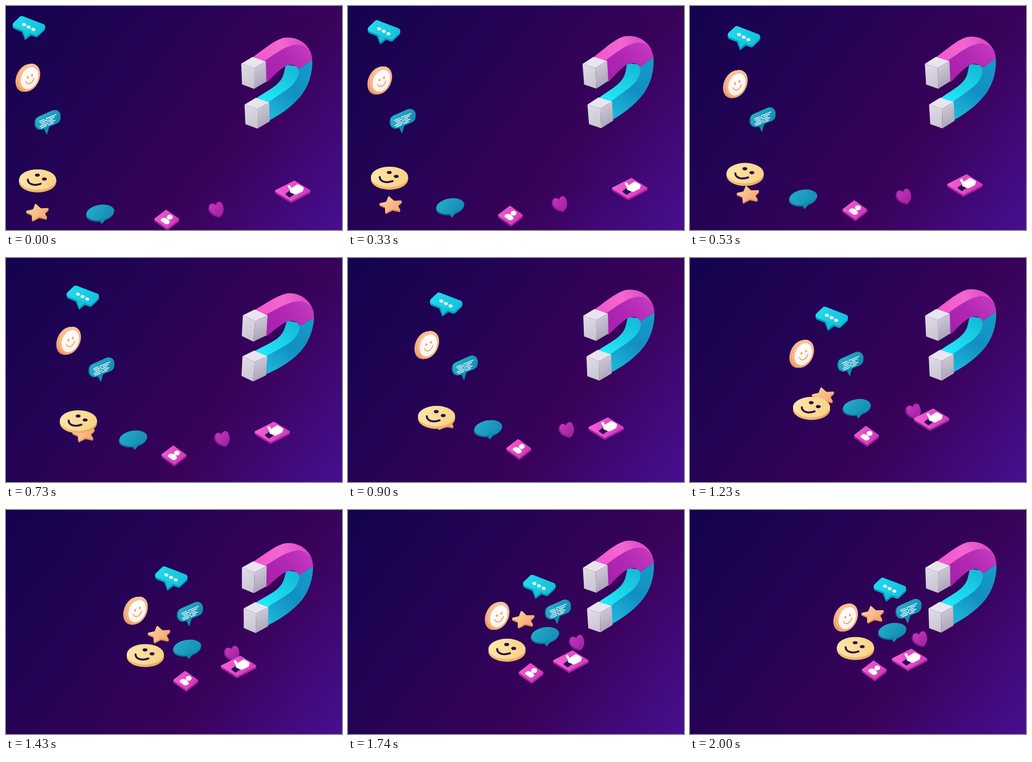
Animation of 600x400 px, one loop 2.03 s. Source, as an HTML page with a canvas:

```html
<!DOCTYPE html>
<html lang="en">
<head>
<meta charset="utf-8">
<title>Magnet pulling icons</title>
<style>
html, body { margin: 0; width: 100%; height: 100%; overflow: hidden; background: #26024f; }
canvas { display: block; width: 600px; height: 400px; }
</style>
</head>
<body>
<canvas id="stage" width="600" height="400"></canvas>
<script>
const ctx = document.getElementById('stage').getContext('2d');
const LOOP = 2030, STEP = 100 / 3, LAST = 60, TAU = Math.PI * 2;
const INK = '#2a0a4c';

function lin(x0, y0, x1, y1, ...colors) {
  const g = ctx.createLinearGradient(x0, y0, x1, y1);
  colors.forEach((c, i) => g.addColorStop(i / (colors.length - 1), c));
  return g;
}

function fill(d, style) {
  ctx.fillStyle = style;
  ctx.fill(typeof d === 'string' ? new Path2D(d) : d);
}

function line(d, style, width) {
  ctx.strokeStyle = style;
  ctx.lineWidth = width;
  ctx.lineCap = ctx.lineJoin = 'round';
  ctx.stroke(new Path2D(d));
}

function oval(x, y, rx, ry, rot = 0) {
  const p = new Path2D();
  p.ellipse(x, y, rx, ry, rot, 0, TAU);
  return p;
}

// Polygon with rounded corners
function poly(pts, r) {
  const p = new Path2D(), n = pts.length;
  const [a, b] = [pts[n - 1], pts[0]];
  p.moveTo((a[0] + b[0]) / 2, (a[1] + b[1]) / 2);
  pts.forEach((q, i) => p.arcTo(...q, ...pts[(i + 1) % n], r));
  p.closePath();
  return p;
}

// Flat tile lying on the ground, its top corner moved sideways by skew
function tile(x, y, rx, ry, skew, r) {
  return poly([[x - rx, y], [x + skew, y - ry], [x + rx, y], [x - skew, y + ry]], r);
}

// Face with a solid side reaching to (dx, dy)
function slab(p, dx, dy, side, face) {
  const n = Math.ceil(Math.hypot(dx, dy) * 2);
  for (let i = n; i > 0; i--) {
    ctx.save();
    ctx.translate(dx * i / n, dy * i / n);
    fill(p, side);
    ctx.restore();
  }
  fill(p, face);
}

function chat() {
  fill('M28 46L34 61L47 51Z', '#0a98b8');
  slab(tile(41, 35, 33, 18, -14, 5), 0, 3.5, '#0b9fbf', lin(12, 25, 68, 45, '#22dcee', '#14bfdc'));
  fill('M30 43L34.5 57L46 47Z', '#16c3dd');
  for (let i = -1; i <= 1; i++) fill(oval(40.5 + 8.3 * i, 37.5 + 4.4 * i, 3.6, 2.7, 0.3), '#fff');
}

function coin() {
  slab(oval(41.5, 128, 18, 25.8, 0.42), -5, 0.5, lin(17, 105, 40, 155, '#ffc89a', '#e58a58'),
    lin(30, 105, 52, 152, '#fcc79d', '#f2a473'));
  fill(oval(42, 129, 14.5, 20.5, 0.42), lin(34, 112, 50, 148, '#fff', '#fff1e6'));
  const ink = '#f0a070';
  fill(oval(38.5, 127.5, 1.7, 2.4, 0.3), ink);
  fill(oval(46.5, 123.5, 1.7, 2.4, 0.3), ink);
  line('M35 135C38 142 47 139 50 129', ink, 1.7);
}

function textBubble() {
  fill('M65 214L73 230L79 210Z', '#128bab');
  slab(poly([[53, 200], [98, 180], [97, 207], [53, 225]], 10), -2, 1, '#107d9e',
    lin(55, 195, 92, 215, '#2ab0cd', '#148bb0'));
  ctx.save();
  ctx.transform(1, -0.42, 0, 1, 57, 206.5);
  ctx.fillStyle = '#eef9fc';
  for (let row = 0; row < 5; row++) {
    const left = 2 + row * 7 % 5, split = 12 + row * 5 % 8, right = 33 - row * 3 % 7;
    ctx.fillRect(left, row * 3.2, split - left, 1.6);
    ctx.fillRect(split + 2, row * 3.2, right - split - 2, 1.6);
  }
  ctx.restore();
}

function smiley() {
  slab(oval(56.5, 310, 33, 18.3), 0, 4.5, lin(24, 0, 90, 0, '#f6c078', '#eda565'),
    lin(30, 300, 85, 322, '#fde5a6', '#f9d386'));
  fill(oval(56, 302, 4.3, 2.8), INK);
  fill(oval(68.5, 309, 4.3, 2.8), INK);
  line('M39 310C39 318 50 322 62 317.5', INK, 3.4);
}

function star() {
  const pts = Array.from({ length: 10 }, (_, i) => {
    const a = (i / 10 - 0.28) * TAU, r = i % 2 ? 0.52 : 1.05;
    return [57 + 23 * r * Math.cos(a), 368.5 + 15.5 * r * Math.sin(a)];
  });
  slab(poly(pts, 1.5), 0, 2.5, '#e08d57', lin(38, 358, 72, 382, '#fdd3a0', '#f3a56d'));
}

function ovalBubble() {
  fill('M163 379L171 389.5L181 377Z', '#0f7fa2');
  slab(oval(168.5, 368.5, 25, 13.5, -0.16), -1, 2.5, '#0f7599',
    lin(150, 358, 188, 382, '#23a9c9', '#148bb4'));
  fill('M167 379L172 387.5L181 376Z', '#148db5');
}

function personCard() {
  slab(tile(287, 380.5, 23, 17, -1, 1.5), 0, 3.5, '#a5229f', lin(270, 370, 304, 388, '#f05ad0', '#d338bb'));
  fill(oval(292.5, 377, 5.2, 4.4), '#fff');
  fill('M276 383C277 377 287 376 292 384C294 388 288 391 284 389Z', '#fff');
}

function heart() {
  const p = new Path2D('M383 376C373 374 363 369 363 360C363 353 369 350 375 356C376 348 384 347 387 355C390 363 389 370 383 376Z');
  slab(p, -2, 2, '#851b8c', lin(365, 352, 388, 372, '#c634bd', '#a021a2'));
}

function likeCard() {
  slab(tile(512, 330, 33, 18.5, 3, 1.5), 0, 3.5, '#a5229f', lin(485, 322, 540, 340, '#f25fd3', '#d439bc'));
  fill(tile(506.5, 336, 8.5, 6, 0, 1.5), '#2a0a5e');
  fill(poly([[507, 327], [521, 318], [532, 324], [530, 331], [518, 337], [507, 333]], 2.5), '#fff');
  line('M510 329L505.5 322', '#fff', 4.5);
}

function block(x, y, h) {
  ctx.save();
  ctx.translate(x, y);
  fill('M0 0L20 -12L44 -4L23 8Z', '#e9e5ef');
  fill(`M0 0L23 8V${h + 8}L1.5 ${h}Z`, lin(0, 5, 20, 42, '#dedbe5', '#c9c5d1'));
  fill(`M23 8L44 -4L45 ${h - 5}L23 ${h + 8}Z`, lin(25, 8, 42, 36, '#cbc5d4', '#aba4b9'));
  ctx.restore();
}

function magnet() {
  // inner surface of the lower arm
  fill('M445 166C470 149 488 142 495 124C498 115 498 109 500 105L524 108C526 140 500 150 467 176Z',
    lin(500, 105, 460, 172, '#14bcd8', '#22eafa'));
  // front face, lower half, then upper half
  fill('M547 96C548 124 538 151 518 170C506 182 490 194 469 205L467 173C490 156 509 147 517 134C522 126 524 119 522 113Z',
    lin(540, 105, 475, 195, '#1799c8', '#128fc2', '#1cb4d8'));
  fill('M462 98C485 80 503 68 522 67C537 68 546 81 547 96L522 113C518 105 510 103 500 107C488 113 476 127 465 137Z',
    lin(465, 125, 535, 72, '#a820ad', '#b028b4', '#c438bd'));
  // outer top strip
  fill('M440 92C462 76 478 62 495 57C516 53 539 64 546 88C540 73 529 68 517 69C500 71 482 84 462 98Z',
    lin(445, 90, 540, 68, '#f257cd', '#f366d0', '#d548c4'));
  block(420, 103, 37);
  block(426, 176, 35);
}

// icon, travel x, travel y
const icons = [
  [chat, 316, 103], [coin, 239, 64], [textBubble, 316, -27], [star, 270, -182], [smiley, 239, -65],
  [ovalBubble, 193, -153], [personCard, 42, -95], [heart, 35, -133], [likeCard, -120, -64]
];

// Swing builds up quickly, then dies away
function swing(k) {
  const s = k / LAST;
  const degrees = 2150 * s ** 3 * Math.exp(-8.2 * s) * Math.cos((k - 22) / 20.5 * TAU);
  return degrees * Math.PI / 180;
}

function backdrop() {
  ctx.fillStyle = lin(0, 0, 576, 432, '#14034f', '#240355', '#39025a', '#470f90');
  ctx.fillRect(0, 0, 600, 400);
}

function draw(ms) {
  const t = Math.floor((ms % LOOP) / 10) * 10;
  const k = Math.min(LAST, Math.floor((t + 3.4) / STEP));
  const s = k / LAST, ease = s * s * (3 - 2 * s);

  backdrop();

  ctx.save();
  ctx.translate(430, 135);
  ctx.rotate(swing(k));
  ctx.translate(-430, -135);
  magnet();
  ctx.restore();

  for (const [icon, dx, dy] of icons) {
    ctx.save();
    ctx.translate(dx * ease, dy * ease);
    icon();
    ctx.restore();
  }
}

const start = performance.now();
function tick() {
  draw(performance.now() - start);
  requestAnimationFrame(tick);
}
tick();
</script>
</body>
</html>
```
